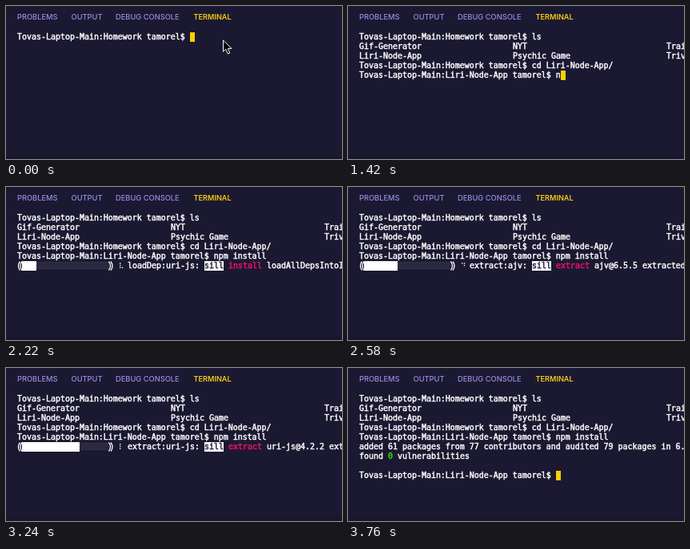
Write an HTML page that moves like this. It is 420 by 192 pixels and loops after 3.78 s.

```html
<!DOCTYPE html>
<html lang="en">
<head>
<meta charset="utf-8">
<title>Terminal install</title>
<style>
  html, body { margin: 0; width: 100%; height: 100%; overflow: hidden; background: #1b1931; }
  svg { display: block; }
  text { white-space: pre; }
  .tabs { font: 500 9.3px Inter, Roboto, sans-serif; fill: #9a8be2; }
  .tabs .on { fill: #f2cb10; font-weight: 600; font-size: 9.15px; }
  #screen { font: 9.967px "DejaVu Sans Mono", "Liberation Mono", monospace; }
  #screen text { stroke-width: .45px; }
</style>
</head>
<body>
<svg width="420" height="192" viewBox="0 0 420 192">
  <defs>
    <pattern id="shade" width="2" height="4" patternUnits="userSpaceOnUse">
      <path d="M0 0h1v1h-1zM1 2h1v1h-1z" fill="#5c5a70"/>
    </pattern>
  </defs>
  <rect width="420" height="192" fill="#1b1931"/>
  <rect y="188" width="420" height="4" fill="#18162c"/>
  <g class="tabs">
    <text x="14" y="17">PROBLEMS</text>
    <text x="81.5" y="17">OUTPUT</text>
    <text x="137" y="17">DEBUG CONSOLE</text>
    <text x="234.5" y="17" class="on">TERMINAL</text>
  </g>
  <g id="screen"></g>
  <path id="pointer" d="M271.5 43V57.2L274.8 54.2L277.3 60L279.8 59L277.4 53.4H282Z" fill="#000" stroke="#fff"/>
</svg>
<script>
const LOOP = 3780, TICK = 20, CELL = 6, LEFT = 14, LINE = 12;
const BAR_START = 2120, DONE = 3680, BAR_CELLS = 18;
const WHITE = '#fff', DARK = '#1b1931', PINK = '#f0126a', GREEN = '#3ad900', YELLOW = '#fad000';

const screen = document.getElementById('screen');
const pointer = document.getElementById('pointer');
const prompt = dir => `Tovas-Laptop-Main:${dir} tamorel$ `;
const HOME = prompt('Homework'), APP = prompt('Liri-Node-App');

// Times at which each successive character has been typed
const LS = [20, 100], CD = [500, 560, 620, 680, 780];
const NPM = Array.from('npm install', (c, i) => 1420 + i * 42);

// Start time, filled cells, task, verb, detail
const INTO = 'loadAllDepsIntoIdealTree';
const STAGES = [
  [2120, 1, 'loadDep:request', 'install', INTO],
  [2160, 2, 'loadDep:har-validator', 'install', INTO],
  [2220, 3, 'loadDep:uri-js', 'install', INTO],
  [2300, 4, 'loadDep:mime-db', 'install', INTO],
  [2400, 5, 'loadDep:ecc-jsbn', 'install', INTO],
  [2500, 7, 'extract:ajv', 'extract', 'ajv@6.5.5'],
  [2600, 8, 'extract:mime-db', 'extract', 'moment@2.22.2'],
  [2700, 9, 'extract:mime-db', 'extract', 'sshpk@1.15.2'],
  [2800, 10, 'extract:mime-db', 'extract', 'ecc-jsbn@0.1.2'],
  [2920, 11, 'extract:mime-db', 'extract', 'axios@0.18.0'],
  [3080, 11, 'extract:uri-js', 'extract', 'mime-db@1.37.0'],
  [3200, 12, 'extract:uri-js', 'extract', 'uri-js@4.2.2'],
  [3380, 13, 'extract:uri-js', 'extract', 'lodash@4.17.11'],
  [3500, 15, 'extract:uri-js', 'extract', 'ajv@6.5.5'],
  [3600, 17, 'extract:uri-js', 'extract', 'punycode@2.1.1']
];

// Braille dots 1-6 lit in each spinner step
const SPIN = ['124', '145', '1456', '456', '3456', '356', '236', '1236', '123', '1234'];

const esc = s => s.replace(/&/g, '&amp;').replace(/</g, '&lt;');
const colX = col => LEFT + col * CELL;
const baseY = row => 42 + row * LINE;
const typed = (text, times, t) => text.slice(0, times.filter(at => at <= t).length);

function put(row, col, text, color = WHITE) {
  return `<text x="${colX(col)}" y="${baseY(row)}" fill="${color}" stroke="${color}">${esc(text)}</text>`;
}

function block(row, col, cells, fill) {
  return `<rect x="${colX(col)}" y="${baseY(row) - 9}" width="${cells * CELL}" height="${LINE}" fill="${fill}"/>`;
}

const cursor = (row, col) => block(row, col, 1, YELLOW);
const promptLine = (row, text, active) => put(row, 0, text) + (active ? cursor(row, text.length) : '');

function spinner(t) {
  const step = (Math.floor((t - 2215) / 24.88) + 17) % SPIN.length;
  return [...SPIN[step]].map(d => {
    const i = d - 1, x = 142 + 2.8 * Math.floor(i / 3), y = 95 + 2.7 * (i % 3);
    return `<rect x="${x}" y="${y}" width="1.4" height="1.4" fill="${WHITE}"/>`;
  }).join('');
}

function progress(t) {
  const [, fill, task, verb, detail] = STAGES.filter(s => s[0] <= t).pop();
  const tag = 23 + task.length + 2, verbCol = tag + 5;
  const tail = verb === 'extract' ? ' extracted to node_modules' : '';
  return '<path d="M17.5 93.5q-4 5.5 0 11M20 93.5q-4 5.5 0 11M128.5 93.5q4 5.5 0 11M131 93.5q4 5.5 0 11" fill="none" stroke="#fff" stroke-width="1.3"/>'
    + `<rect x="20" y="94" width="${BAR_CELLS * CELL}" height="10" fill="url(#shade)"/>`
    + block(5, 1, fill, WHITE)
    + spinner(t)
    + put(5, 23, task + ':')
    + block(5, tag, 4, WHITE) + put(5, tag, 'sill', DARK)
    + put(5, verbCol, verb, PINK)
    + put(5, verbCol + verb.length + 1, detail + tail);
}

function listing() {
  return [['Gif-Generator', 'NYT', 'Train-Schedule'], ['Liri-Node-App', 'Psychic Game', 'Trivia-Game']]
    .map((names, r) => names.map((name, c) => put(1 + r, 32 * c, name)).join('')).join('');
}

function summary(t) {
  return put(5, 0, 'added 61 packages from 77 contributors and audited 79 packages in 6.254s')
    + put(6, 0, 'found') + put(6, 6, '0', GREEN) + put(6, 8, 'vulnerabilities')
    + (t >= DONE + TICK ? promptLine(8, APP, true) : cursor(8, 0));
}

function render(t) {
  let out = promptLine(0, HOME + typed('ls', LS, t), t < 220);
  if (t >= 220) out += listing();
  if (t >= 220 && t < 240) out += cursor(3, 0);
  if (t >= 240) {
    const cd = t >= 900 ? 'cd Liri-Node-App/' : typed('cd Li', CD, t);
    out += promptLine(3, HOME + cd, t < 1180);
  }
  if (t >= 1180 && t < 1200) out += cursor(4, 0);
  if (t >= 1200) out += promptLine(4, APP + typed('npm install', NPM, t), t < 1980);
  if (t >= 1980 && t < BAR_START) out += cursor(5, 0);
  if (t >= BAR_START && t < DONE) out += progress(t);
  if (t >= DONE) out += summary(t);
  screen.innerHTML = out;
  pointer.style.display = t < LS[0] ? '' : 'none';
}

const start = performance.now();
let last = -1;
function frame(now) {
  const t = Math.floor(Math.max(0, now - start) % LOOP / TICK) * TICK;
  if (t !== last) render(last = t);
  requestAnimationFrame(frame);
}
render(0);
requestAnimationFrame(frame);
</script>
</body>
</html>
```
